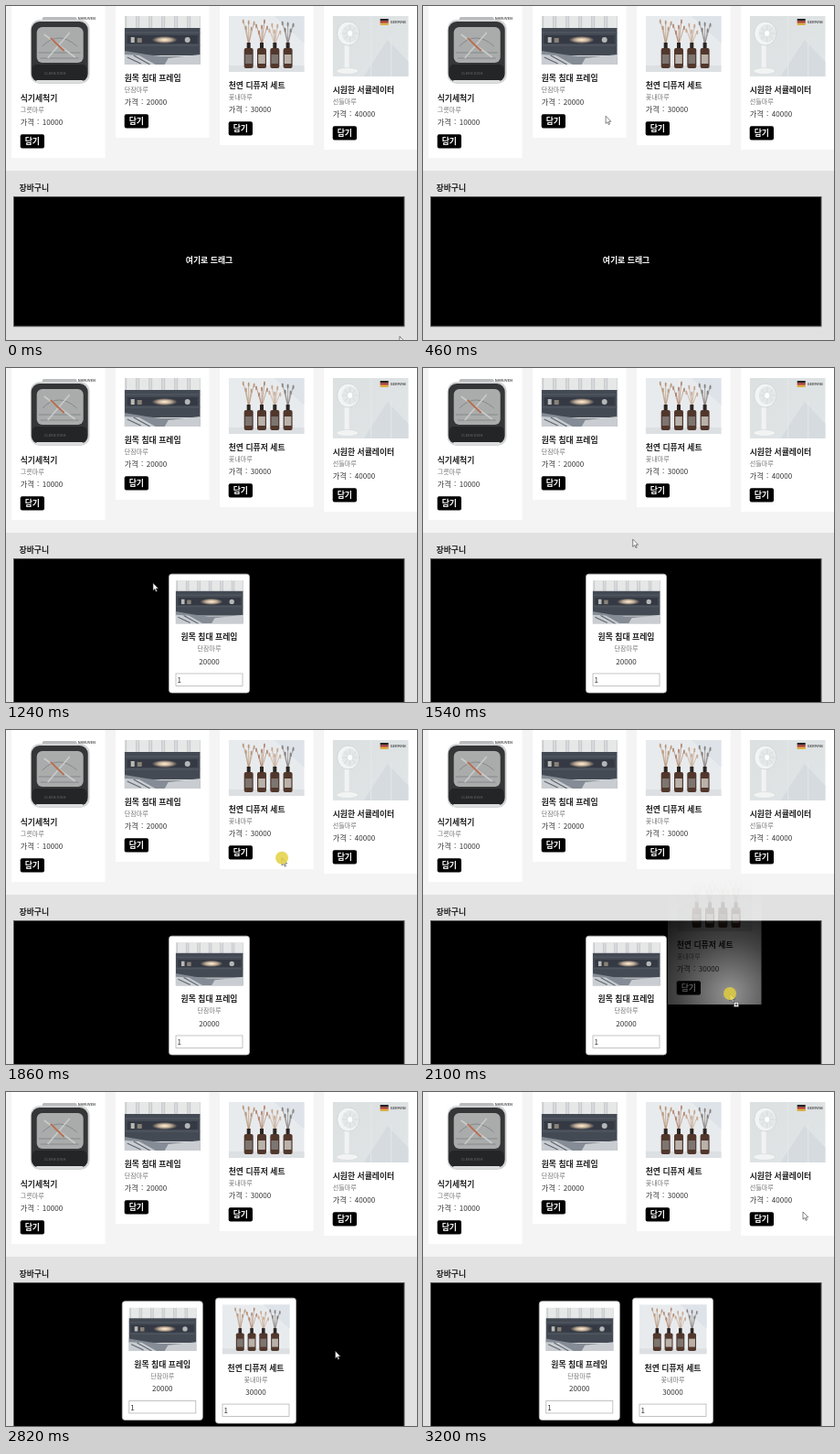
An HTML page for the animation above (3.22 s loop, 450 by 365 pixels).

```html
<!DOCTYPE html>
<html lang="ko">
<head>
<meta charset="utf-8">
<style>
html, body { margin: 0; width: 100%; height: 100%; overflow: hidden; background: #f4f4f4; }
svg { display: block; }
text { font-family: "Noto Sans CJK KR", "Noto Sans CJK", "Noto Sans", sans-serif; fill: #333; }
.title { font-size: 8.85px; font-weight: 700; fill: #222; }
.shop { font-size: 7.1px; fill: #777; }
.price { font-size: 8.1px; word-spacing: 1.2px; }
.white { font-size: 8.9px; font-weight: 700; fill: #fff; }
.mid { text-anchor: middle; }
.tiny { font-size: 4px; font-weight: 700; fill: #555; }
</style>
</head>
<body>
<svg id="stage" width="450" height="365" viewBox="0 0 450 365"></svg>
<script>
const items = [
  { name: '식기세척기', shop: '그릇마루', price: 10000, h: 75 },
  { name: '원목 침대 프레임', shop: '단잠마루', price: 20000, h: 53 },
  { name: '천연 디퓨저 세트', shop: '꽃내마루', price: 30000, h: 59 },
  { name: '시원한 서큘레이터', shop: '선들마루', price: 40000, h: 66 }
];
items[2].h = 61;

const rect = (x, y, w, h, fill, more = '') =>
  `<rect x="${x}" y="${y}" width="${w}" height="${h}" fill="${fill}" ${more}/>`;
const path = (d, stroke, w = 1, fill = 'none') =>
  `<path d="${d}" stroke="${stroke}" stroke-width="${w}" fill="${fill}"/>`;
const disc = (x, y, rx, ry, fill, more = '') =>
  `<ellipse cx="${x}" cy="${y}" rx="${rx}" ry="${ry}" fill="${fill}" ${more}/>`;
// y is the middle of the line
const text = (x, y, cls, s) => `<text x="${x}" y="${y + 3.2}" class="${cls}">${s}</text>`;
const repeat = (n, f) => Array.from({ length: n }, (_, i) => f(i)).join('');

const bottle = i => {
  const x = 22 + 14.3 * i;
  const tone = ['#b08a68', '#a8765a', '#c09a7c', '#77706c'][i];
  return repeat(5, k => {
    const dx = (k - 2) * 3, top = 4 + (k * 7 + i * 5) % 13;
    return path(`M${x} 31L${x + dx} ${top}`, tone, .6) +
      disc(x + dx, top + 2, 1, 2.4, tone, 'opacity=".7"');
  }) +
    rect(x - 2, 29, 4, 8, '#2b2523') +
    rect(x - 5, 35, 10, 22, '#51372c', 'rx="2"') +
    rect(x - 3.8, 42, 7.6, 10, i % 2 ? '#b9b2aa' : '#7d7570');
};

const photos = [
  rect(0, 0, 83, 75, '#fff') +
  text(63, 1, 'tiny', 'NARUVEN') +
  rect(24, 1, 38, 7, '#b9bbbc', 'rx="2"') +
  rect(11, 4, 65, 70, '#d3d4d5', 'rx="10"') +
  rect(12, 6, 62, 66, '#353637', 'rx="9"') +
  rect(18, 12, 51, 39, '#aaacac', 'rx="6"') +
  path('M20 40H66M22 46H64M24 33Q42 15 62 33', '#858989', 1) +
  path('M26 20L60 45M54 18L30 46', '#c9cbcb', 1.6) +
  path('M33 24L48 38', '#b56f52', 2) +
  rect(13, 53, 60, 17, '#242526', 'rx="5"') +
  text(26, 61, 'tiny', 'CLEAN DISH') +
  rect(17, 70, 52, 3, '#dcdddd', 'rx="1.5"'),

  rect(0, 0, 83, 53, '#d8dadb') +
  repeat(6, i => rect(2 + 14 * i, -2, 11, 16, '#e6e7e7', 'stroke="#bfc3c6" stroke-width=".8"')) +
  rect(0, 13, 83, 30, '#444a54') +
  rect(3, 21, 77, 9, '#343943') +
  rect(30, 22, 28, 8, 'url(#lamp)') +
  path('M0 18H83M0 32H83', '#596069', .8) +
  rect(7, 23, 4, 6, '#b9b9b6') + rect(14, 24, 5, 5, '#8a8278') + disc(69, 26, 3, 3, '#b4b7b8') +
  path('M0 38L24 42L40 44H83V53H0Z', 'none', 0, '#858c95') +
  path('M0 42L16 43L34 53H0ZM48 46L83 42V53H44Z', 'none', 0, '#c9cdd1') +
  path('M3 45L18 52M10 43L28 53', '#5e6670', 1.2),

  rect(0, 0, 83, 61, '#e8ebee') +
  path('M50 0L83 30V0Z', 'none', 0, '#dde3e8') +
  rect(0, 54, 83, 7, '#dde0e3') +
  repeat(4, bottle),

  rect(0, 0, 83, 66, 'url(#room)') +
  path('M34 66L60 26L83 50V66Z', 'none', 0, '#d5dbde') +
  path('M42 0V66M64 24V66', '#e4e8e9', 1) +
  rect(13, 29, 5, 30, '#f1f3f3') +
  disc(16, 60, 12, 3.5, '#f2f4f4', 'stroke="#ced3d4" stroke-width=".5"') +
  disc(17, 19, 12, 13, '#f3f5f5', 'stroke="#c8cecf" stroke-width=".7"') +
  disc(19, 19, 9, 10, '#e4e8e9') +
  repeat(8, i => `<path d="M19 19V10" stroke="#cdd3d4" stroke-width=".6" transform="rotate(${45 * i} 19 19)"/>`) +
  disc(19, 19, 2.5, 3, '#fff') +
  rect(52, 3, 9, 2.5, '#222') + rect(52, 5.5, 9, 2.2, '#b5332c') + rect(52, 7.7, 9, 2.2, '#d9ab3a') +
  text(63, 5, 'tiny', 'GERMAN')
];

const photo = (i, x, y, w) =>
  `<use href="#p${i}" x="${x}" y="${y}" width="${w}" height="${items[i].h * w / 83}"/>`;

function card(i) {
  const { name, shop, price, h } = items[i], x = 6 + 114 * i, left = x + 9.7, y = 11 + h;
  return rect(x, 0, 102.5, y + 80, '#fff') + photo(i, left, 11, 83) +
    text(left, y + 15, 'title', name) +
    text(left, y + 27, 'shop', shop) +
    text(left, y + 41, 'price', '가격 : ' + price) +
    rect(left, y + 54.3, 26.3, 15.2, '#000', 'rx="2"') +
    text(left + 5, y + 61.8, 'white', '담기');
}

function cartItem(i) {
  const { name, shop, price, h } = items[i], y = h * 74 / 83 + 7.5;
  return rect(.5, .5, 88, y + 75, '#fff', 'rx="3" stroke="#bbb" stroke-width=".8"') + photo(i, 7.7, 7.5, 74) +
    text(44.5, y + 14.8, 'title mid', name) +
    text(44.5, y + 26.8, 'shop mid', shop) +
    text(44.5, y + 41, 'price mid', price) +
    rect(8, y + 54.5, 73, 13.5, '#fff', 'stroke="#b5b5b5" stroke-width=".8"') +
    text(9.5, y + 61.5, 'price', 1);
}

// where each dragged card is grabbed, and when: press, lift, drop
const drags = [
  { item: 1, x: 196, y: 116, press: 500, lift: 560, drop: 1040 },
  { item: 2, x: 302, y: 140, press: 1820, lift: 1880, drop: 2340 }
];

const ghost = ({ item, x, y }, n) =>
  `<radialGradient id="fade${n}" gradientUnits="userSpaceOnUse" cx="${x}" cy="${y}" r="130">
    <stop offset="0" stop-color="#fff" stop-opacity=".58"/>
    <stop offset=".45" stop-color="#fff" stop-opacity=".26"/>
    <stop offset="1" stop-color="#fff" stop-opacity="0"/></radialGradient>
  <mask id="mask${n}" maskUnits="userSpaceOnUse" x="0" y="0" width="450" height="200">
    ${rect(0, 0, 450, 200, `url(#fade${n})`)}</mask>
  <g id="ghost${n}"><g mask="url(#mask${n})">${card(item)}</g></g>`;

stage.innerHTML = `<defs>
  <radialGradient id="lamp"><stop stop-color="#fff3dc"/><stop offset=".5" stop-color="#c4ae96"/>
    <stop offset="1" stop-color="#343943"/></radialGradient>
  <linearGradient id="room" x2="1" y2="1"><stop stop-color="#dce0e1"/><stop offset="1" stop-color="#e0e5e7"/></linearGradient>
  ${photos.map((p, i) => `<symbol id="p${i}" viewBox="0 0 83 ${items[i].h}">${p}</symbol>`).join('')}
  </defs>` +
  rect(0, 0, 450, 365, '#f4f4f4') + rect(0, 180, 450, 185, '#e1e1e1') +
  items.map((_, i) => card(i)).join('') +
  text(14.5, 199, 'title', '장바구니') +
  rect(8.5, 208.5, 427.5, 141.5, '#000', 'id="box" stroke="#555"') +
  `<g id="hint">${text(222.5, 278, 'white mid', '여기로 드래그')}</g>
  <g id="cart0">${cartItem(1)}</g><g id="cart1">${cartItem(2)}</g>` +
  drags.map(ghost).join('') +
  `<g id="mouse">
    ${path('M0 0V8.2L1.9 6.5L3.2 9.4L4.5 8.8L3.2 6H5.8Z', '#333', .6, '#fff')}
    ${disc(0, 0, 7, 7, '#e3d03c', 'id="spot" opacity=".82"')}
    <g id="plus">${rect(4.5, 9.5, 5, 5, '#fff', 'stroke="#444" stroke-width=".5"')}${path('M7 10.5V13.5M5.5 12H8.5', '#222', .8)}</g>
  </g>`;

// time, x, y
const route = [
  [0, 431, 361], [500, 196, 116], [560, 196, 116], [800, 131, 243], [880, 130, 247],
  [1040, 130, 247], [1240, 161, 235], [1300, 164, 233], [1800, 303, 136], [1870, 302, 140],
  [2100, 336, 288], [2180, 338, 293], [2620, 338, 293], [2820, 360.5, 283], [3140, 416, 131], [3220, 416, 131]
];

function mouseAt(t) {
  const i = route.findIndex(p => p[0] > t), [t0, x0, y0] = route[i - 1], [t1, x1, y1] = route[i];
  const u = (t - t0) / (t1 - t0), e = u * u * (3 - 2 * u);
  return [x0 + (x1 - x0) * e, y0 + (y1 - y0) * e];
}

const get = id => document.getElementById(id);
const show = (id, on) => get(id).style.display = on ? '' : 'none';
const move = (id, x, y) => get(id).setAttribute('transform', `translate(${x} ${y})`);

function draw(now) {
  const t = now % 3220, [x, y] = mouseAt(t);
  const [first, second] = drags.map(d => t >= d.drop);
  drags.forEach((d, n) => {
    show('ghost' + n, t >= d.lift && t < d.drop);
    move('ghost' + n, x - d.x, y - d.y);
  });
  show('hint', !first);
  show('cart0', first);
  show('cart1', second);
  get('box').setAttribute('height', first ? 170 : 141.5);
  move('cart0', second ? 126.8 : 178, second ? 228.2 : 224.7);
  move('cart1', 229, 224.7);
  move('mouse', x, y);
  show('spot', drags.some(d => t >= d.press && t < d.drop));
  show('plus', drags.some(d => t >= d.lift && t < d.drop && y > 208));
  requestAnimationFrame(draw);
}
requestAnimationFrame(draw);
</script>
</body>
</html>
```
